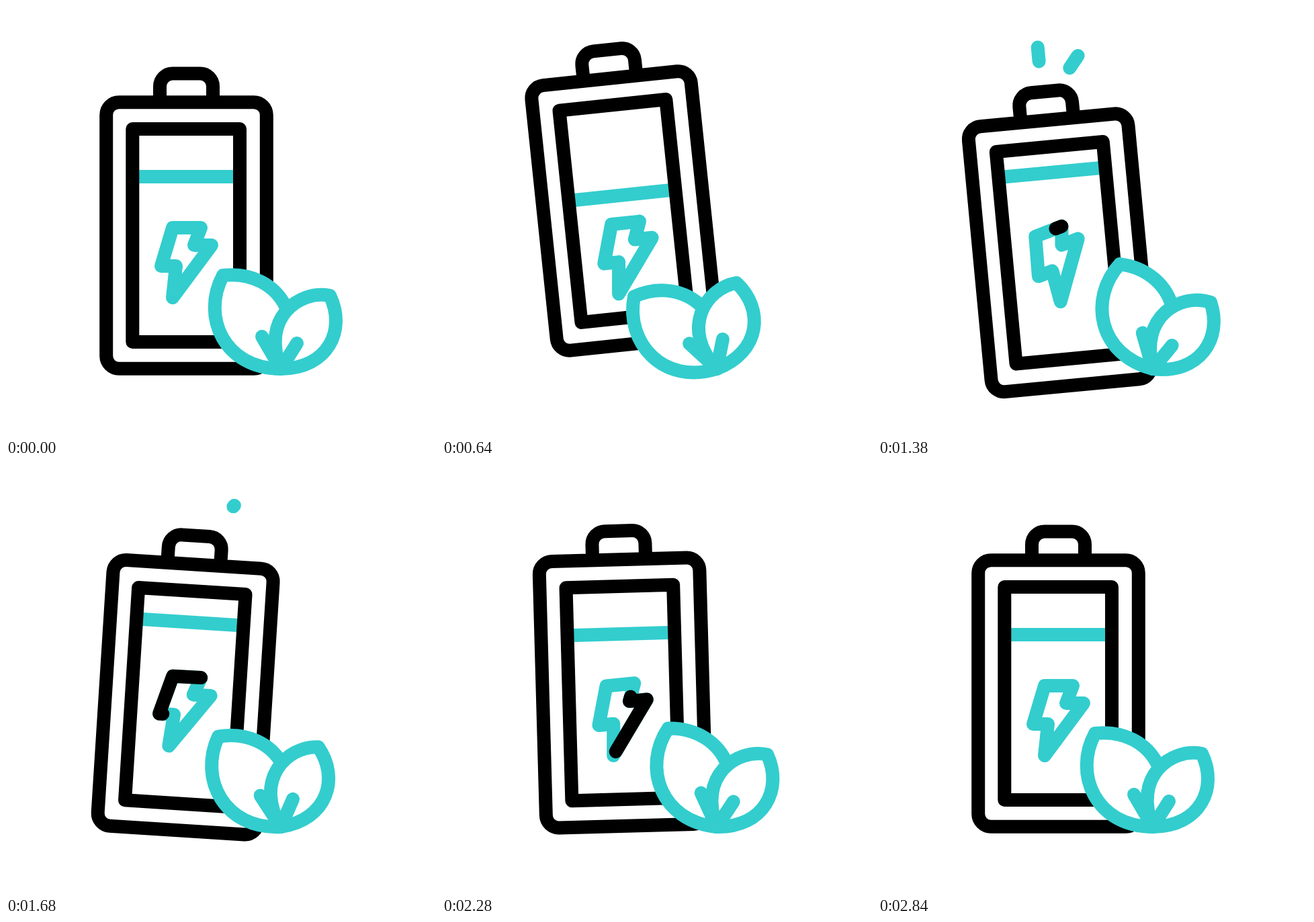
An HTML page with a canvas for the animation above (3600 ms loop, 640 by 640 pixels).

```html
<!DOCTYPE html>
<html lang="en">
<head>
<meta charset="utf-8">
<title>Green battery</title>
<style>
html, body { margin: 0; width: 100%; height: 100%; overflow: hidden; background: #fff; }
canvas { display: block; width: 100vmin; height: 100vmin; }
</style>
</head>
<body>
<canvas id="stage" width="640" height="640"></canvas>
<script>
const ctx = document.getElementById('stage').getContext('2d');
const TEAL = '#33cdce', BLACK = '#000';
const LOOP = 3600, STEP = 20, STILL = 2840, RAD = Math.PI / 180;

const clamp = v => Math.max(0, Math.min(1, v));
const ramp = (t, from, to) => clamp((t - from) / (to - from));
const mix = (a, b, k) => a + (b - a) * k;
const ease = k => (1 - Math.cos(Math.PI * k)) / 2;

// Damped swing: each peak flips sign and keeps a share of the last one,
// each gap between peaks is scaled by shrink, then it settles at zero.
function damped({ amp, keep, from = 0, first, gap, shrink, peaks }) {
  return t => {
    let start = from, end = first, a = 0, b = amp;
    for (let i = 1; i <= peaks && t >= end; i++) {
      start = end;
      end += gap * shrink ** (i - 1);
      a = b;
      b = i < peaks ? -b * keep : 0;
    }
    return mix(a, b, ease(ramp(t, start, Math.min(end, STILL))));
  };
}

const lift = damped({ amp: -39.5, keep: 0.66, first: 780, gap: 620, shrink: 0.94, peaks: 4 });
const tilt = damped({ amp: -9.7, keep: 0.76, first: 510, gap: 420, shrink: 0.98, peaks: 6 });
const level = damped({ amp: 64, keep: 0.51, first: 640, gap: 745, shrink: 1.18, peaks: 2 });
const boltDrop = damped({ amp: 29.5, keep: 0.8, first: 630, gap: 750, shrink: 1.36, peaks: 2 });
const boltTurn = damped({ amp: -16, keep: 0.84, from: 940, first: 1420, gap: 500, shrink: 1.12, peaks: 3 });
const bigTurn = damped({ amp: -20.5, keep: 0.7, from: 150, first: 820, gap: 570, shrink: 0.8, peaks: 5 });
const smallTurn = damped({ amp: -21.3, keep: 0.64, first: 600, gap: 600, shrink: 0.83, peaks: 5 });

function spin(x, y, deg) {
  ctx.translate(x, y);
  ctx.rotate(deg * RAD);
  ctx.translate(-x, -y);
}

function line(points, color) {
  ctx.strokeStyle = color;
  ctx.beginPath();
  points.forEach(([x, y]) => ctx.lineTo(x, y));
  ctx.stroke();
}

const bolt = [[290, 330], [248, 330], [231, 387], [253, 387], [248, 434], [306, 356], [280, 356], [290, 330]];
const sides = bolt.slice(1).map(([x, y], i) => Math.hypot(x - bolt[i][0], y - bolt[i][1]));
const boltLength = sides.reduce((a, b) => a + b);

// Points of the bolt outline between two fractions of its length.
function boltPart(start, end) {
  const from = start * boltLength, to = end * boltLength, points = [];
  let pos = 0;
  sides.forEach((len, i) => {
    const a = Math.max(from, pos), b = Math.min(to, pos + len);
    const at = d => bolt[i].map((v, axis) => mix(v, bolt[i + 1][axis], (d - pos) / len));
    if (a < b) points.push(at(a), at(b));
    pos += len;
  });
  return points;
}

function drawBolt(t) {
  ctx.save();
  ctx.translate(0, boltDrop(t));
  spin(268.5, 382, boltTurn(t));
  line(bolt, TEAL);
  line(boltPart(ramp(t, 1800, 2670), ramp(t, 1350, 2345)), BLACK);
  ctx.restore();
}

// Three sparks fan out from the cap, side runs -1, 0, 1 from left to right.
function drawSpark(side, t) {
  const on = 1080 + 160 * side, off = on + 450, out = Math.abs(side);
  if (t <= on || t >= off) return;
  const at = k => [264.5 + side * mix(44.5, 58.5, k), mix(55 + 14 * out, 34 + 18 * out, k)];
  line([at(ramp(t, off - 100, off)), at(ramp(t, on, on + 90))], TEAL);
}

function drawBattery(t) {
  ctx.save();
  ctx.translate(0, lift(t));
  spin(268.5, 320, tilt(t));
  for (let side = -1; side <= 1; side++) drawSpark(side, t);

  ctx.fillStyle = TEAL;
  ctx.fillRect(190, 244 + level(t), 156, 20);
  drawBolt(t);

  ctx.strokeStyle = BLACK;
  ctx.beginPath();
  ctx.moveTo(229, 141);
  ctx.arcTo(229, 100.5, 268, 100.5, 19);
  ctx.arcTo(308, 100.5, 308, 141, 19);
  ctx.lineTo(308, 141);
  ctx.roundRect(149.2, 143.2, 238.6, 396.6, 19);
  ctx.rect(188.3, 183, 159.7, 317);
  ctx.stroke();
  ctx.restore();
}

const bigLeaf = new Path2D('M323 401C290 462 325 540 409 540C425 520 432 482 416 447C400 415 365 396 323 401Z');
const smallLeaf = new Path2D('M482 431C507 482 479 540 409 540C379 465 436 422 482 431Z');

function drawLeaf(shape, stem, deg) {
  ctx.save();
  spin(409, 540, deg);
  ctx.fillStyle = '#fff';
  ctx.strokeStyle = TEAL;
  ctx.fill(shape);
  ctx.stroke(shape);
  line([stem, [409, 540]], TEAL);
  ctx.restore();
}

function draw(t) {
  ctx.fillStyle = '#fff';
  ctx.fillRect(0, 0, 640, 640);
  ctx.lineWidth = 20;
  ctx.lineCap = ctx.lineJoin = 'round';
  drawBattery(t);
  drawLeaf(bigLeaf, [381, 492], bigTurn(t));
  drawLeaf(smallLeaf, [433, 502], smallTurn(t));
}

const begin = performance.now();
function tick() {
  const t = (performance.now() - begin) % LOOP;
  draw(Math.min(STILL, Math.floor(t / STEP) * STEP));
  requestAnimationFrame(tick);
}
tick();
</script>
</body>
</html>
```
